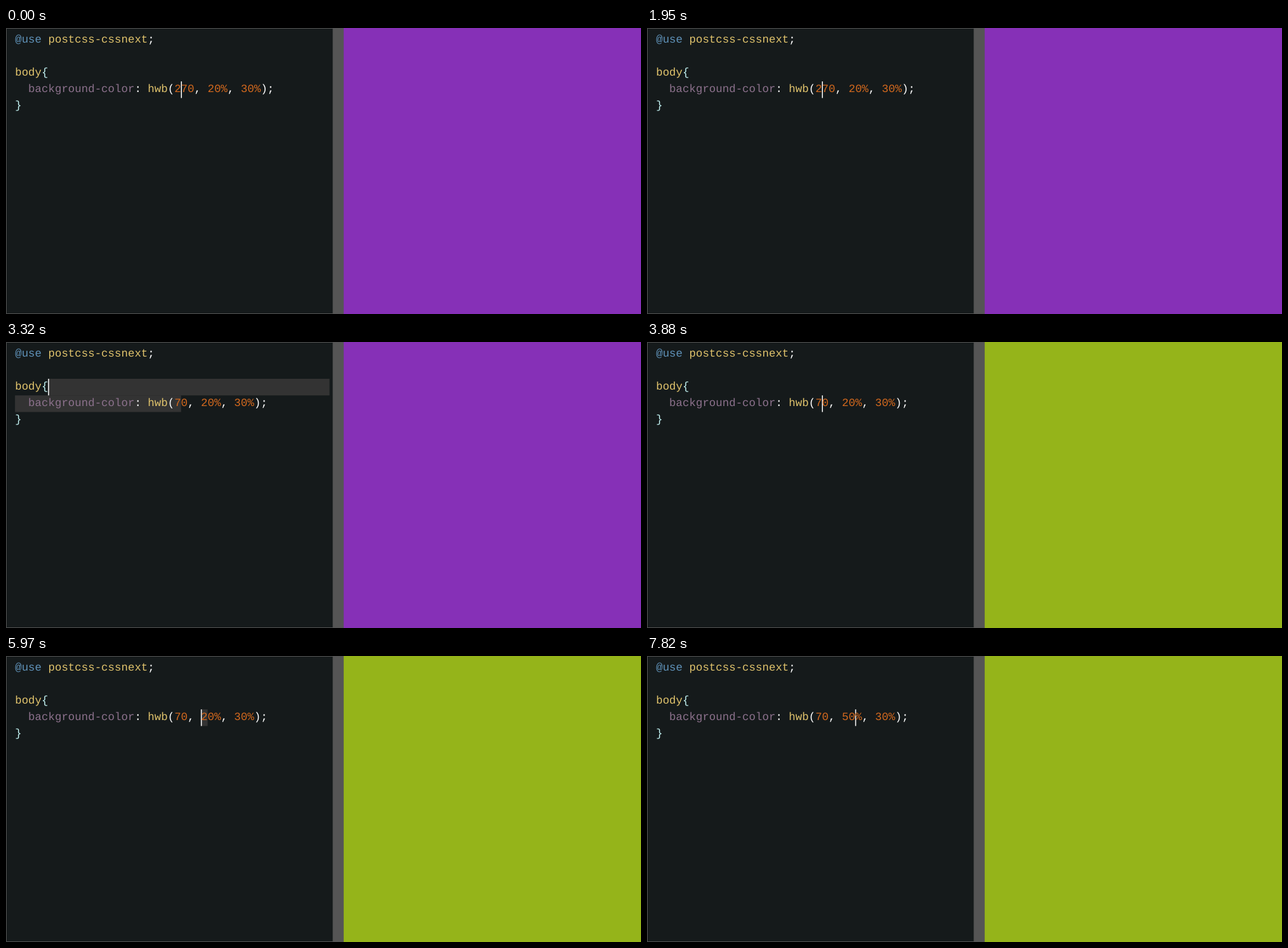
An HTML page for the animation above (8 s loop, 1000x451 px).

```html
<!DOCTYPE html>
<html lang="en">
<head>
<meta charset="utf-8">
<title>Live CSS editor</title>
<style>
  html, body { margin: 0; width: 100%; height: 100%; overflow: hidden; background: #151a1b; }
  #stage { position: relative; width: 1000px; height: 451px; overflow: hidden; }
  #panes { position: absolute; left: 0; top: 0; }
  #code {
    position: absolute; left: 14.2px; top: 5.6px; margin: 0; color: #fff;
    font: 17.43px/26.2px "Liberation Mono", "Courier New", monospace;
    text-rendering: geometricPrecision;
    -webkit-font-smoothing: antialiased;
  }
  .selection { fill: #333; }
  .rule { color: #6093ba; }
  .name { color: #e0c36c; }
  .brace { color: #c3f3f3; }
  .prop { color: #8c718c; }
  .num { color: #d3691e; }
  .matched { outline: 1px solid #777; outline-offset: -0.5px; }
</style>
</head>
<body>
<div id="stage">
  <svg id="panes" width="1000" height="451">
    <path d="M515 .5H.5V450.5H515" fill="none" stroke="#555"/>
    <rect x="514.5" width="18" height="451" fill="#555"/>
    <rect id="preview" x="531.8" width="468.2" height="451"/>
    <rect class="selection" id="selectionA"/>
    <rect class="selection" id="selectionB"/>
    <rect id="caret" fill="#fff"/>
  </svg>
  <pre id="code"><span class="rule">@use</span> <span class="name">postcss-cssnext</span>;

<span class="name">body</span><span class="brace">{</span>
  <span class="prop">background-color</span>: <span class="name">hwb</span><span class="paren">(</span><span class="num" id="hue"></span>, <span class="num" id="white"></span>, <span class="num">30%</span><span class="paren">)</span>;
<span class="brace">}</span></pre>
</div>
<script>
const LOOP = 8000;
const CHAR = 10.46, LINE = 26.2, LEFT = 14.2, TOP = 5.6, LINE_END = 509.5;
const CARET_WIDTH = 1.5;
const PURPLE = '#8630b7', GREEN = '#95b41a';
const $ = id => document.getElementById(id);
const parens = document.querySelectorAll('.paren');

// Each step changes only the listed parts of the editor state.
const steps = [
  { at: 0, line: 3, col: 25, caret: true, hue: '270', white: '20%', color: PURPLE, select: '' },
  { at: 360, caret: false },
  { at: 820, caret: true },
  { at: 1380, caret: false },
  { at: 1950, caret: true },
  { at: 2130, col: 24, hue: '70' },
  { at: 2590, caret: false },
  { at: 2870, col: 25, caret: true },
  { at: 3320, line: 2, col: 5, select: 'lines' },
  { at: 3880, line: 3, col: 25, select: '', color: GREEN },
  { at: 4350, caret: false },
  { at: 4680, col: 26, caret: true },
  { at: 4960, col: 27 },
  { at: 5150, col: 28 },
  { at: 5240, col: 29 },
  { at: 5790, caret: false },
  { at: 5970, col: 28, caret: true, select: 'digit' },
  { at: 6430, caret: false },
  { at: 6990, caret: true },
  { at: 7260, col: 29, white: '50%', select: '' },
  { at: 7820, col: 30 }
];

const columnX = col => LEFT + col * CHAR;

// A width of zero hides the box.
function place(id, line, x, width) {
  const box = { x, y: TOP + line * LINE, width, height: LINE };
  for (const key in box) $(id).setAttribute(key, box[key]);
}

function showSelection(kind) {
  const lines = kind === 'lines';
  if (lines) place('selectionA', 2, columnX(5), LINE_END - columnX(5));
  else place('selectionA', 3, columnX(28), kind === 'digit' ? CHAR : 0);
  place('selectionB', 3, LEFT, lines ? 25 * CHAR : 0);
}

function render(time) {
  const state = Object.assign({}, ...steps.filter(step => step.at <= time));
  $('hue').textContent = state.hue;
  $('white').textContent = state.white;
  $('preview').style.fill = state.color;
  place('caret', state.line, columnX(state.col) - 0.2, state.caret ? CARET_WIDTH : 0);
  parens.forEach(p => p.classList.toggle('matched', state.col === 24));
  showSelection(state.select);
}

const start = performance.now();
function tick() {
  render((performance.now() - start) % LOOP);
  requestAnimationFrame(tick);
}
tick();
</script>
</body>
</html>
```
